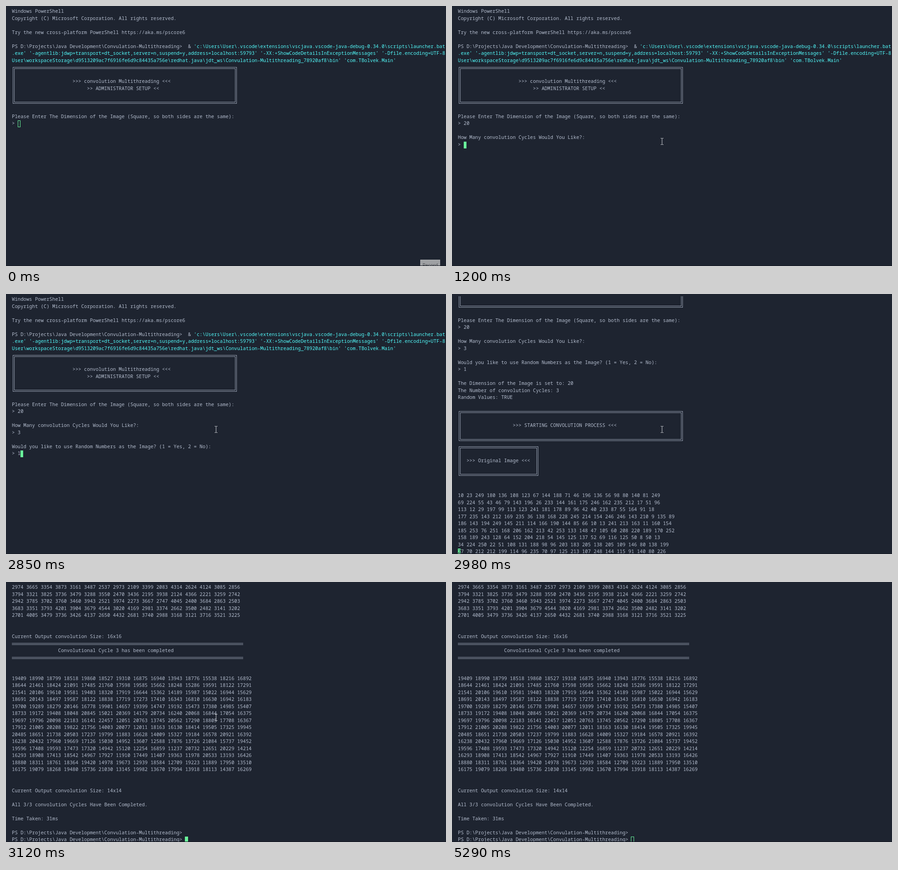
Write an HTML page that moves like this. It is 974 px wide and 575 px high and loops after 5370 ms.

```html
<!DOCTYPE html>
<html lang="en">
<head>
<meta charset="utf-8">
<title>Convolution terminal</title>
<style>
:root { --bg: #1e2430; --fg: #b4bdce; --line: #98a1b2; --green: #69f59b; --loop: 5370ms step-end infinite; }
html, body { margin: 0; width: 100%; height: 100%; overflow: hidden; background: var(--bg); }
#stage { position: relative; width: 974px; height: 575px; overflow: hidden; background: var(--bg); }
#stage::after { content: ""; position: absolute; left: 0; right: 0; bottom: 0; height: 1px; background: #171b25; }
#view { position: absolute; inset: 5px 0 0 0; overflow: hidden; }
#log {
  position: absolute; left: 13px; top: -.75px; margin: 0; white-space: pre;
  font: 10.6667px/15.5px "Noto Sans Mono", "DejaVu Sans Mono", monospace;
  font-variant-ligatures: none; color: var(--fg); animation: scroll var(--loop);
}
#log em { font-style: normal; font-weight: 500; color: #52fafa; }
#log b { font-weight: inherit; color: var(--bg); }
.box, .rule { position: absolute; box-sizing: border-box; top: calc(var(--row) * 15.5px + 6.75px); }
.box {
  left: 2px; width: calc(var(--cols) * 6.4px - 3.2px); height: calc(var(--rows) * 15.5px - 12px);
  border: 1px solid var(--line); outline: 1px solid var(--line); outline-offset: -4px;
}
.rule { left: 0; width: 512px; height: 4px; border: solid var(--line); border-width: 1px 0; }

#caret {
  position: absolute; box-sizing: border-box; width: 6px; height: 15px;
  border: 1px solid var(--green); animation: caret var(--loop), focus var(--loop);
}
#mouse { position: absolute; left: 0; top: 0; animation: mouse var(--loop); }
#tip {
  position: absolute; left: 917px; top: 561px; width: 44px; height: 24px; box-sizing: border-box;
  border: 1px solid #aeb0b3; background: #9fa1a4; color: #45484d; text-align: center;
  font: 10.5px/23px "Open Sans", "Noto Sans", sans-serif; animation: tip var(--loop);
}

.two { animation: two var(--loop); }
.zero { animation: zero var(--loop); }
.ask2 { animation: ask2 var(--loop); }
.three { animation: three var(--loop); }
.ask3 { animation: ask3 var(--loop); }
.one { animation: one var(--loop); }
.run { animation: run var(--loop); }

@keyframes two { 0% { visibility: hidden } 13.59%, 100% { visibility: visible } }
@keyframes zero { 0% { visibility: hidden } 17.31%, 100% { visibility: visible } }
@keyframes ask2 { 0% { visibility: hidden } 22.34%, 100% { visibility: visible } }
@keyframes three { 0% { visibility: hidden } 33.33%, 100% { visibility: visible } }
@keyframes ask3 { 0% { visibility: hidden } 35.75%, 100% { visibility: visible } }
@keyframes one { 0% { visibility: hidden } 53.07%, 100% { visibility: visible } }
@keyframes run { 0% { visibility: hidden } 55.49%, 100% { visibility: visible } }
@keyframes tip { 0% { visibility: visible } 1.3%, 100% { visibility: hidden } }

@keyframes scroll {
  0% { top: -.75px }
  55.49% { top: -186.75px }
  57.35% { top: -1008.25px }
  58.1%, 100% { top: -1612.75px }
}
@keyframes focus {
  0% { background: transparent }
  11.17% { background: var(--green) }
  98.5%, 100% { background: transparent }
}
@keyframes caret {
  0% { left: 26px; top: 253px }
  13.59% { left: 32px; top: 253px }
  17.31% { left: 39px; top: 253px }
  21.04% { left: 13px; top: 269px }
  22.34% { left: 26px; top: 300px }
  33.33% { left: 32px; top: 300px }
  35.75% { left: 26px; top: 346px }
  53.07% { left: 32px; top: 346px }
  55.49% { left: 13px; top: 563px; width: 6px }
  58.1%, 100% { left: 396px; top: 563px; width: 7px }
}
@keyframes mouse {
  0% { transform: translate(925px, 580px) }
  1.3% { transform: translate(880px, 530px) }
  2.97% { transform: translate(770px, 455px) }
  4.65% { transform: translate(650px, 385px) }
  6.33% { transform: translate(550px, 335px) }
  8% { transform: translate(490px, 305px) }
  9.68% { transform: translate(462px, 292px) }
  69.27% { transform: translate(470px, 295px) }
  70.39% { transform: translate(482px, 300px) }
  75.23% { transform: translate(491px, 307px); animation-timing-function: steps(7, end) }
  84.35% { transform: translate(535px, 346px); animation-timing-function: steps(7, end) }
  93.48%, 100% { transform: translate(990px, 580px) }
}
</style>
</head>
<body>
<div id="stage">
<div id="caret"></div>
<div id="view"><pre id="log">Windows PowerShell
Copyright (C) Microsoft Corporation. All rights reserved.

Try the new cross-platform PowerShell https://aka.ms/pscore6

PS D:\Projects\Java Development\Convulation-Multithreading&gt;  &amp; <em>'c:\Users\User\.vscode\extensions\vscjava.vscode-java-debug-0.34.0\scripts\launcher.bat
.exe' '-agentlib:jdwp=transport=dt_socket,server=n,suspend=y,address=localhost:59793' '-XX:+ShowCodeDetailsInExceptionMessages' '-Dfile.encoding=UTF-8
User\workspaceStorage\d9513209ac7f6916fe6d9c84435a756e\redhat.java\jdt_ws\Convulation-Multithreading_78920af8\bin' 'com.TBolvek.Main'</em>
<i class="box" style="--row:8;--cols:78;--rows:6"></i>

                     &gt;&gt;&gt; convolution Multithreading &lt;&lt;&lt;
                          &gt;&gt; ADMINISTRATOR SETUP &lt;&lt;



Please Enter The Dimension of the Image (Square, so both sides are the same):
&gt; <span class="two">2</span><span class="zero">0</span>

<span class="ask2">How Many convolution Cycles Would You Like?:
&gt; </span><span class="three">3</span>

<span class="ask3">Would you like to use Random Numbers as the Image? (1 = Yes, 2 = No):
&gt; </span><span class="one">1</span>

<span class="run" id="run"></span></pre></div>
<svg id="mouse" width="6" height="15" viewBox="0 0 6 15" fill="none" stroke="#d5d8dc">
<path d="M0 .5H2.5M3.5 .5H6M3 1V14M0 14.5H2.5M3.5 14.5H6"/>
</svg>
<div id="tip">Record</div>
</div>
<script>
const FIRST_ROW = 24;
const lines = [];
const print = (...text) => lines.push(...text);
const row = () => FIRST_ROW + lines.length;

function random(seed) {
  return () => {
    seed = (seed + 0x6D2B79F5) | 0;
    let t = Math.imul(seed ^ (seed >>> 15), 1 | seed);
    t = (t + Math.imul(t ^ (t >>> 7), 61 | t)) ^ t;
    return ((t ^ (t >>> 14)) >>> 0) / 4294967296;
  };
}

// 3x3 kernel: the four corners plus the centre
function convolve(m) {
  const inner = m.slice(2);
  return inner.map((_, y) => inner.map((_, x) =>
    m[y][x] + m[y][x + 2] + m[y + 1][x + 1] + m[y + 2][x] + m[y + 2][x + 2]));
}

// caretRow: the row whose first digit sits under the block caret
function printMatrix(m, caretRow) {
  m.forEach((nums, y) => {
    const text = nums.join(" ");
    print(y === caretRow ? `<b>${text[0]}</b>${text.slice(1)}` : text);
  });
  print("", "");
}

function printBox(title, indent, cols) {
  print(`<i class="box" style="--row:${row()};--cols:${cols};--rows:5"></i>`, "",
    " ".repeat(indent) + `&gt;&gt;&gt; ${title} &lt;&lt;&lt;`, "", "");
}

function printRule() {
  print(`<i class="rule" style="--row:${row()}"></i>`);
}

print("The Dimension of the Image is set to: 20",
  "The Number of convolution Cycles: 3",
  "Random Values: TRUE", "");
printBox("STARTING CONVOLUTION PROCESS", 19, 78);
printBox("Original Image", 3, 28);
print("", "");

const next = random(7);
let image = Array.from({ length: 20 }, () =>
  Array.from({ length: 20 }, () => 8 + Math.floor(next() * 247)));
printMatrix(image, 8);

for (let cycle = 1; cycle <= 3; cycle++) {
  image = convolve(image);
  printRule();
  print(" ".repeat(16) + `Convolutional Cycle ${cycle} has been completed`);
  printRule();
  print("", "");
  printMatrix(image, cycle === 2 ? 8 : -1);
  print(`Current Output convolution Size: ${image.length}x${image.length}`);
}

const prompt = "PS D:\\Projects\\Java Development\\Convulation-Multithreading&gt;";
print("", "All 3/3 convolution Cycles Have Been Completed.", "",
  "Time Taken: 31ms", "", prompt, prompt);
document.getElementById("run").innerHTML = lines.join("\n");
</script>
</body>
</html>
```
